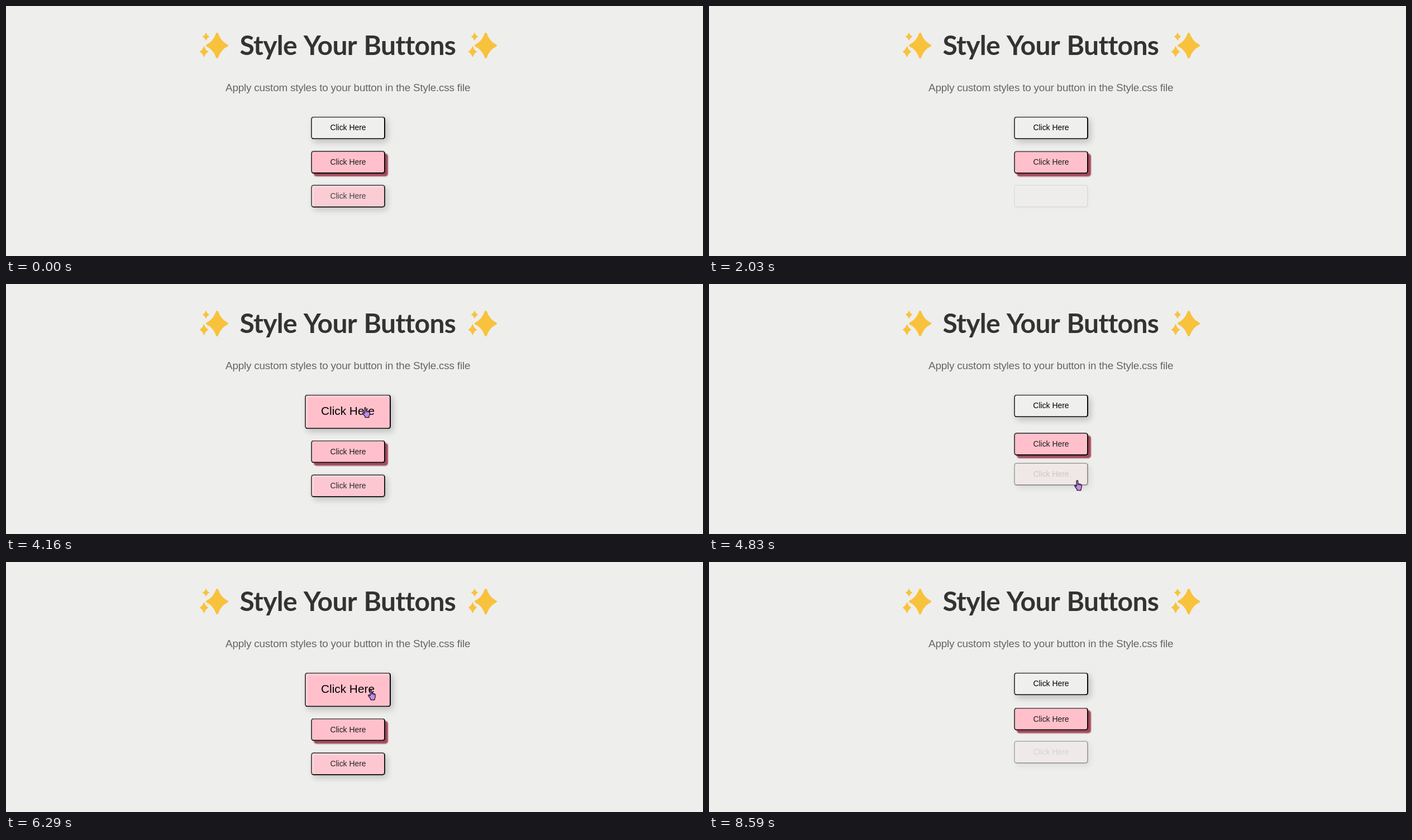
An HTML page for the animation above (8660 ms loop, 1248x449 px).

```html
<!DOCTYPE html>
<html lang="en">
<head>
<meta charset="utf-8">
<title>Style Your Buttons</title>
<style>
  html, body { margin: 0; width: 100%; height: 100%; overflow: hidden; background: #eeeeec; }
  #stage { position: relative; width: 1248px; height: 449px; overflow: hidden; }
  #art, #hand { position: absolute; left: 0; top: 0; }
  .title { font: bold 48px Lato, sans-serif; letter-spacing: -.7px; word-spacing: 2.6px; fill: #333; }
  .lead { font: 18.9px "Liberation Sans", Arial, sans-serif; letter-spacing: -.2px; fill: #666; }
  .star { fill: #f9c23c; stroke: #f9c23c; stroke-width: 4; stroke-linejoin: round; }
  .btn {
    position: absolute; left: 546px; width: 133px; height: 41px; padding: 0 0 1px;
    box-sizing: border-box; display: flex; align-items: center; justify-content: center;
    border: 2px solid; border-color: #4c4c4c #0a0a0a #0a0a0a #4c4c4c; border-radius: 5px;
    font: 13.9px "Liberation Sans", Arial, sans-serif; white-space: nowrap; color: #000;
    box-shadow: inset 2px 2px 3px rgba(255, 255, 255, .5), 4px 5px 12px rgba(0, 0, 0, .2);
  }
  #grow { top: 198px; transform: translateY(.4px); }
  #bounce {
    top: 260px; background: #ffc0cb; color: #1c1c1c;
    box-shadow: 5px 5px 2px #a04a5a;
  }
</style>
</head>
<body>
<div id="stage">
  <svg id="art" width="1248" height="449">
    <defs>
      <path id="spark" d="M0-21Q5.5-5.5 18 0Q5.5 5.5 0 21Q-5.5 5.5-18 0Q-5.5-5.5 0-21Z"/>
      <g id="sparkles" class="star">
        <use href="#spark" x="378" y="71"/>
        <use href="#spark" transform="translate(358 55) scale(.3)"/>
        <use href="#spark" transform="translate(354.5 82) scale(.38 .42)"/>
      </g>
    </defs>
    <use href="#sparkles"/>
    <use href="#sparkles" x="481"/>
    <text class="title" x="418.5" y="88">Style Your Buttons</text>
    <text class="lead" x="393" y="152.5">Apply custom styles to your button in the Style.css file</text>
  </svg>
  <div class="btn" id="grow">Click Here</div>
  <div class="btn" id="bounce">Click Here</div>
  <div class="btn" id="fade">Click Here</div>
  <svg id="hand" width="16" height="21">
    <path d="M4 2.2Q4 .8 5.3.8T6.6 2.2V7Q7.8 6.2 8.8 7.4Q10 6.8 11 8Q13.2 7.6 13.2 10V13Q13.2 15 12 16.4V18.6H5V16.8Q3 14.6 1 11.4Q.4 9.8 1.6 9.6Q2.8 9.5 4 11.4Z"
      fill="#c489ee" stroke="#111" stroke-width="1.2" stroke-linejoin="round"/>
    <path d="M6.6 7V9.6M8.9 7.6V9.8M11.1 8.2V10" fill="none" stroke="#111" stroke-width=".8"/>
  </svg>
</div>
<script>
  const LOOP = 8660;
  const FADE = 1525, FADE_LOW = 2160;
  const BOUNCE = 2050, BOUNCE_START = 105;
  const HOVERS = [[2830, 4390], [5600, 6600]];
  // time, x, y of the pointer
  const PATH = [
    [2560, 634, 384], [2640, 636, 310], [2710, 637, 261], [2830, 637, 234], [2950, 638, 221],
    [4310, 638, 221], [4380, 652, 250], [4450, 674, 367], [4540, 662, 353], [4640, 654, 352],
    [5460, 654, 352], [5600, 648, 240], [5740, 648, 229],
    [6500, 648, 229], [6600, 664, 256], [6700, 720, 350], [6800, 786, 432]
  ];
  const [grow, bounce, fade, hand] =
    ["grow", "bounce", "fade", "hand"].map(id => document.getElementById(id));

  const clamp = v => Math.min(1, Math.max(0, v));
  const mix = (a, b, p) => a + (b - a) * p;
  const blend = (a, b, p) => `rgb(${a.map((v, i) => mix(v, b[i], p)).join()})`;
  const PAPER = [239, 239, 238], PINK = [255, 192, 203], INK = [0, 0, 0];

  function bezier(x1, y1, x2, y2) {
    const at = (a, b, s) => 3 * a * s * (1 - s) ** 2 + 3 * b * s * s * (1 - s) + s ** 3;
    return x => {
      x = clamp(x);
      let lo = 0, hi = 1;
      for (let i = 0; i < 24; i++) {
        const mid = (lo + hi) / 2;
        if (at(x1, x2, mid) < x) lo = mid; else hi = mid;
      }
      return at(y1, y2, (lo + hi) / 2);
    };
  }
  const ease = bezier(.25, .1, .25, 1);
  const easeInOut = bezier(.42, 0, .58, 1);

  // 0 to 1 and back, one way lasting half a period
  function swing(t, half) {
    const p = (((t / half) % 2) + 2) % 2;
    return p < 1 ? p : 2 - p;
  }

  function moveHand(t) {
    const i = PATH.findIndex(p => p[0] > t);
    hand.style.visibility = i > 0 ? "visible" : "hidden";
    if (i < 1) return;
    const [a, b] = [PATH[i - 1], PATH[i]];
    const p = (t - a[0]) / (b[0] - a[0]);
    hand.style.transform = `translate(${mix(a[1], b[1], p)}px, ${mix(a[2], b[2], p)}px)`;
  }

  function draw(t) {
    const g = HOVERS.reduce((s, [on, off]) =>
      s + ease((t - on) / 500) - ease((t - off) / 500), 0);
    Object.assign(grow.style, {
      left: 546 - 11 * g + "px",
      width: 133 + 21 * g + "px",
      height: 41 + 20.6 * g + "px",
      fontSize: 13.9 + 6.9 * g + "px",
      background: blend(PAPER, PINK, g)
    });

    const shift = 20.6 * g;
    const drop = 10.2 * easeInOut(swing(t - BOUNCE_START, BOUNCE / 2));
    bounce.style.transform = `translateY(${shift + drop - .1}px)`;

    const f = .97 * ease(swing(t - FADE_LOW, FADE));
    Object.assign(fade.style, {
      top: 321 + shift + "px",
      opacity: f,
      background: blend(PAPER, PINK, f),
      color: blend(PAPER, INK, f)
    });

    moveHand(t);
  }

  const start = performance.now();
  function tick() {
    draw((performance.now() - start) % LOOP);
    requestAnimationFrame(tick);
  }
  tick();
</script>
</body>
</html>
```
